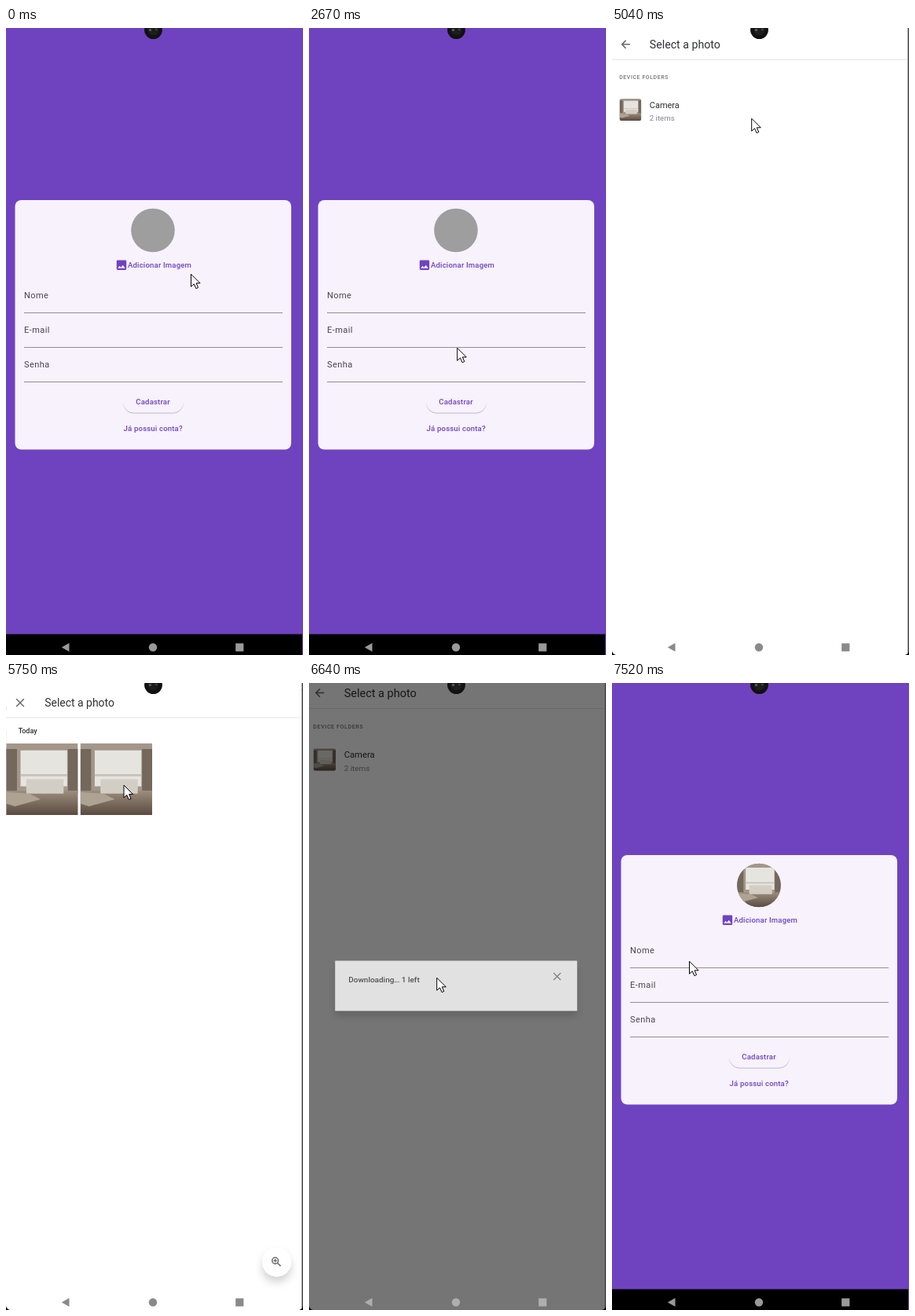
An HTML page for the animation above (7990 ms loop, 378 by 798 pixels).

```html
<!DOCTYPE html>
<html lang="pt">
<head>
<meta charset="utf-8">
<title>Cadastro</title>
<style>
  html, body { margin: 0; width: 100%; height: 100%; overflow: hidden; background: #6f43bf; }
  #stage { display: block; width: 378px; height: 798px; font-family: Roboto, sans-serif; }
  .mid { text-anchor: middle; }
  .label { font-size: 11px; letter-spacing: .45px; fill: #4b4552; }
  .action { font-size: 9.6px; font-weight: 500; letter-spacing: .15px; fill: #6f43bf; text-anchor: middle; }
  .head { font-size: 7.4px; font-weight: 500; fill: #303034; }
  .app { font-size: 8.6px; fill: #77777b; text-anchor: middle; }
  .title { font-size: 14.2px; fill: #303134; }
  .rule { stroke: #938d98; }
  .icon { fill: none; stroke: #6a6a6e; stroke-width: 1.5; }
  .thin { stroke: #858588; stroke-width: 1.3; }
  .pill { fill: #f7f2fc; filter: url(#lift); }
  #picker, #grid { transform-origin: 187px 383px; }
  #folders { transform-origin: 187px 396px; }
  #dialog { transform-origin: 187px 386px; }
</style>
</head>
<body>
<svg id="stage" viewBox="0 0 378 798">
  <defs>
    <filter id="soft" x="-20%" y="-40%" width="140%" height="200%">
      <feDropShadow dx="0" dy="7" stdDeviation="5" flood-opacity=".18"/>
    </filter>
    <filter id="lift" x="-20%" y="-20%" width="140%" height="160%">
      <feDropShadow dx="0" dy="1" stdDeviation=".7" flood-color="#55407a" flood-opacity=".4"/>
    </filter>
    <linearGradient id="floor" x2="0" y2="1">
      <stop stop-color="#9c8d7c"/><stop offset="1" stop-color="#594b40"/>
    </linearGradient>
    <clipPath id="avatarClip"><circle cx="187" cy="257.5" r="27.8"/></clipPath>
    <clipPath id="thumbClip"><rect x="9.5" y="90" width="28" height="28" rx="3"/></clipPath>
    <symbol id="room" viewBox="0 0 100 100" preserveAspectRatio="none">
      <path fill="#a3978a" d="M0 0H100V100H0Z"/>
      <path fill="#74675b" d="M0 8H15V66H0ZM86 8H100V70H86Z"/>
      <path fill="#e6e4df" d="M20 10H85V60H20Z"/>
      <path fill="#c6c1b8" d="M20 43H85V46H20Z"/>
      <path fill="url(#floor)" d="M0 66H100V100H0Z"/>
      <path fill="#d3cec5" d="M28 50H80V70H28Z"/>
      <path fill="#aea293" d="M0 68L32 70L48 78L12 88L0 84Z"/>
    </symbol>
    <symbol id="open" viewBox="0 0 6 6" overflow="visible">
      <path d="M.3 .3H5.7V5.7H.3ZM1.5 3H4M3 1.7L4.3 3L3 4.3" fill="none" stroke="#4a4a4e" stroke-width=".8"/>
    </symbol>
  </defs>

  <path fill="#6f43bf" d="M0 0H378V798H0Z"/>

  <g id="signup">
    <rect x="11.5" y="219" width="351.5" height="317.5" rx="8" fill="#f7f2fc"/>
    <circle cx="187" cy="257.5" r="27.8" fill="#9e9e9e"/>
    <g id="avatar" clip-path="url(#avatarClip)"><use href="#room" x="159" y="229.5" width="56" height="56"/></g>
    <rect id="imageHover" x="132" y="288" width="111" height="28" rx="14" fill="#eee7f9"/>
    <path transform="translate(138.7 293.4) scale(.69)" fill="#6f43bf" d="M21 19V5c0-1.1-.9-2-2-2H5c-1.1 0-2 .9-2 2v14c0 1.1.9 2 2 2h14c1.1 0 2-.9 2-2zM8.5 13.5l2.5 3L14.5 12l4.5 6H5z"/>
    <text class="action" x="195.5" y="305.2">Adicionar Imagem</text>
    <text class="label" x="23" y="344">Nome</text>
    <text class="label" x="23" y="388">E-mail</text>
    <text class="label" x="23" y="432">Senha</text>
    <path class="rule" d="M23 362.5H352M23 406.5H352M23 450.5H352"/>
    <rect class="pill" x="149" y="462" width="77" height="27.5" rx="13.7"/>
    <text class="action" x="187" y="479.4">Cadastrar</text>
    <rect id="linkHover" x="141.5" y="495.5" width="91.5" height="27.5" rx="13.7" fill="#efe9f9"/>
    <text class="action" x="187.2" y="512.5">Já possui conta?</text>
  </g>

  <g id="login">
    <rect x="11.5" y="285" width="351.5" height="186" rx="8" fill="#f7f2fc"/>
    <text class="label" x="23" y="318">E-mail</text>
    <text class="label" x="23" y="362">Senha</text>
    <path class="rule" d="M23 336.5H352M23 380.5H352"/>
    <rect class="pill" x="149" y="396" width="77" height="27.5" rx="13.7"/>
    <text class="action" x="187" y="413.4">Entrar</text>
    <text class="action" x="187" y="446.5">Não possui conta?</text>
  </g>

  <path d="M0 771.5H377V798H0Z"/>

  <g id="picker">
    <rect x="4.3" y="-30" width="366" height="821" rx="4" fill="#fdfcfe"/>
    <path class="icon" d="M22.5 32H34.5M22.5 35.7H34.5M22.5 39.4H34.5"/>
    <text x="58" y="40.6" font-size="13.6" font-weight="500" fill="#303034">Recent</text>
    <circle class="icon" cx="314.8" cy="33.8" r="3.9"/>
    <path class="icon" d="M317.7 36.7L322 41"/>
    <path d="M347.5 31V40.1" stroke="#5f5f64" stroke-width="2.8" stroke-linecap="round" stroke-dasharray="0 4.5"/>
    <text class="head" x="20.3" y="75.5">BROWSE FILES IN OTHER APPS</text>
    <rect id="appHover" x="195" y="86" width="166" height="59" rx="4" fill="#ececef"/>
    <circle cx="95.5" cy="103.5" r="8" fill="#2d9b58"/>
    <circle cx="278.5" cy="103.5" r="8" fill="#e4574a"/>
    <text class="app" x="95.5" y="129.7">Shelf</text>
    <text class="app" x="278.5" y="129.7">Albums</text>
    <use href="#open" x="92.8" y="134" width="6" height="6"/>
    <use href="#open" x="275.5" y="134" width="6" height="6"/>
    <text class="head" x="20.3" y="168.2">RECENT IMAGES ON PHONE</text>
    <path fill="none" stroke="#5f5f64" stroke-width="2.4" stroke-dasharray="2.4 1 7.6" d="M332 161.8H343M332 165.3H343M332 168.8H343"/>
    <rect x="146.8" y="259.8" width="80.8" height="58.6" rx="1.5" fill="none" stroke="#dadce0" stroke-width="3.4"/>
    <path d="M179 270.3H195" stroke="#dadce0" stroke-width="3" stroke-linecap="round"/>
    <g stroke-width="4" fill="none">
      <path stroke="#d9614f" d="M187.2 217.5V222M158 235L162.3 237.3M216.3 235L212 237.3"/>
      <path stroke="#dadce0" stroke-width="3.3" d="M170 222L172.5 225.5M204 222L201.5 225.5M153.5 250.8L158 251.4M221 250.8L216.5 251.4"/>
    </g>
    <text class="mid" x="187" y="380.3" font-size="10.5" fill="#303034">No items</text>
  </g>

  <g id="album">
    <g id="folders">
      <path fill="#fff" d="M-60 -60H440V860H-60Z"/>
      <path class="icon" d="M23 21H13M17.7 16L12.7 21L17.7 26"/>
      <text class="title" x="47.8" y="26">Select a photo</text>
      <path stroke="#e3e3e5" d="M-60 40.5H440"/>
      <text x="9.3" y="65" font-size="7" font-weight="500" letter-spacing=".55" fill="#77777b">DEVICE FOLDERS</text>
      <path id="rowHover" fill="#f0f0f1" d="M-20 81H400V127H-20Z"/>
      <g clip-path="url(#thumbClip)"><use href="#room" x="9.5" y="90" width="28" height="28"/></g>
      <text x="47.8" y="101.8" font-size="11" fill="#303134">Camera</text>
      <text x="47.8" y="118.2" font-size="9.7" fill="#85858a">2 items</text>
    </g>
    <path id="scrim" d="M0 0H378V798H0Z"/>
    <g id="grid">
      <path fill="#fff" d="M5 -30H369.5V789H5Z"/>
      <path class="icon" d="M17.5 29.5L27 39M27 29.5L17.5 39"/>
      <text class="title" x="52.8" y="39" style="font-size:13.6px">Select a photo</text>
      <path stroke="#e3e3e5" d="M5 52.5H369"/>
      <text x="20" y="72.2" font-size="8.8" font-weight="500" fill="#303134">Today</text>
      <use href="#room" x="5" y="84.5" width="89" height="89"/>
      <path fill="#d9e6f5" d="M97 84.5H186V173.5H97Z"/>
      <use id="tile" href="#room" x="97" y="84.5" width="89" height="89" style="transform-origin:141.5px 129px"/>
      <circle cx="340.5" cy="728" r="18" fill="#fff" filter="url(#soft)"/>
      <path class="icon" d="M341.5 729.2L345.5 733M336.7 726.3H340.7M338.7 724.3V728.3"/>
      <circle class="icon" cx="338.7" cy="726.3" r="3.8"/>
    </g>
    <path id="dim" d="M0 0H378V798H0Z"/>
    <g id="dialog">
      <path fill="#fff" filter="url(#soft)" d="M26.5 352H348V418.5H26.5Z"/>
      <text x="44.3" y="381.2" font-size="10.4" font-weight="500" fill="#4a4a4e">Downloading… 1 left</text>
      <path class="icon thin" d="M316.7 368.2L326.2 377.7M326.2 368.2L316.7 377.7"/>
    </g>
    <path fill="#4a4a4a" d="M376.4 0H378V798H376.4Z"/>
    <path d="M0 793Q1 797 5 798H0ZM378 793Q377 797 373 798H378Z"/>
  </g>

  <g id="nav">
    <path d="M80.5 782.8V793.8L70.8 788.3Z"/>
    <circle cx="187" cy="788.3" r="5.2"/>
    <path d="M292.2 783.2H302.4V793.4H292.2Z"/>
  </g>
  <circle cx="187.5" cy="2.6" r="11.4" fill="#111"/>
  <circle cx="187.5" cy="2.6" r="7" fill="#1d1d1f"/>
  <circle cx="183.5" cy="2.5" r="1.6" fill="#606064"/>
  <circle cx="191.3" cy="2" r="1.3" fill="#48484c"/>
  <path id="cursor" d="M0 0V16L3.8 12.6L6.4 18.4L9.1 17.2L6.6 11.6H11.6Z" fill="#fff" stroke="#000" stroke-linejoin="round"/>
</svg>

<script>
const LOOP = 7990;
const el = Object.fromEntries([...document.querySelectorAll('#stage [id]')].map(e => [e.id, e]));

// Progress from 0 to 1 of a step that begins at start and lasts duration.
const linear = (t, start, duration) => Math.min(1, Math.max(0, (t - start) / duration));
const easeOut = (t, start, duration) => 1 - (1 - linear(t, start, duration)) ** 3;
const smooth = (t, start, duration) => {
  const p = linear(t, start, duration);
  return p * p * (3 - 2 * p);
};
const between = (t, from, to) => t >= from && t < to;

const setOpacity = (id, value) => el[id].style.opacity = Number(value);
const setScale = (id, value) => el[id].style.transform = `scale(${value})`;

// Places the pointer reaches, with the time of arrival.
const stops = [
  { at: 0, x: 235.5, y: 313.2 },
  { at: 1180, x: 154, y: 330 },
  { at: 1600, x: 171.5, y: 515.2 },
  { at: 2250, x: 188, y: 445 },
  { at: 2850, x: 190.5, y: 314 },
  { at: 3560, x: 190.5, y: 318.2 },
  { at: 4350, x: 275, y: 116 },
  { at: 4980, x: 177.7, y: 115.2 },
  { at: 5650, x: 150, y: 130 },
  { at: 6160, x: 166.7, y: 182.2 },
  { at: 6600, x: 162.7, y: 375.2 },
  { at: 7520, x: 98.5, y: 354.2 }
];

// Longer moves take longer; between moves the pointer rests.
function pointer(t) {
  const pos = { ...stops[0] };
  stops.slice(1).forEach((to, i) => {
    const dx = to.x - stops[i].x, dy = to.y - stops[i].y;
    const duration = 120 + 1.2 * Math.hypot(dx, dy);
    const p = smooth(t, to.at - duration, duration);
    pos.x += dx * p;
    pos.y += dy * p;
  });
  return pos;
}

function drawForms(t) {
  const login = between(t, 1860, 2500);
  setOpacity('login', login);
  setOpacity('signup', !login);
  setOpacity('linkHover', between(t, 1540, 1860));
  setOpacity('imageHover', between(t, 2860, 3600));
  setOpacity('avatar', t >= 6700);
}

function drawPicker(t) {
  setOpacity('picker', t < 6700 ? linear(t, 3500, 100) : 0);
  setScale('picker', .873 + .15 * easeOut(t, 3500, 300));
  setOpacity('appHover', t >= 4430);
}

function drawAlbum(t) {
  // Windows in the background are pushed larger and settle when they return.
  const pushed = 1 - easeOut(t, 4900, 400) + easeOut(t, 5400, 250) - linear(t, 5990, 1185);
  setOpacity('album', linear(t, 4780, 120) - linear(t, 6740, 190));
  setScale('folders', .967 + .123 * pushed);
  setOpacity('rowHover', between(t, 5220, 5600));

  setOpacity('grid', linear(t, 5390, 170) - linear(t, 6100, 350));
  setScale('grid', .886 + .14 * easeOut(t, 5380, 300) - .05 * linear(t, 6100, 250));
  setScale('tile', 1 - .18 * linear(t, 5800, 100));

  setOpacity('scrim', .4 * (linear(t, 6100, 130) - linear(t, 6230, 170)));
  setOpacity('dim', .3 * linear(t, 6020, 110) + .24 * linear(t, 6230, 150) - .54 * linear(t, 6660, 150));
  setOpacity('dialog', linear(t, 6020, 100) - linear(t, 6560, 380));
  setScale('dialog', 1.03 - .03 * linear(t, 6030, 100) - .042 * linear(t, 6230, 410));
}

function drawNav(t) {
  const overPicker = linear(t, 3500, 100) - linear(t, 4780, 120);
  const overAlbum = linear(t, 4780, 120) - linear(t, 6740, 190);
  const dimmed = linear(t, 6020, 110) - linear(t, 6740, 190);
  const grey = 154 + 61 * overPicker - 16 * overAlbum + 36 * dimmed;
  el.nav.setAttribute('fill', `rgb(${grey} ${grey} ${grey})`);
}

const start = performance.now();
function frame() {
  const t = (performance.now() - start) % LOOP;
  drawForms(t);
  drawPicker(t);
  drawAlbum(t);
  drawNav(t);
  const { x, y } = pointer(t);
  el.cursor.setAttribute('transform', `translate(${x} ${y})`);
  requestAnimationFrame(frame);
}
frame();
</script>
</body>
</html>
```
